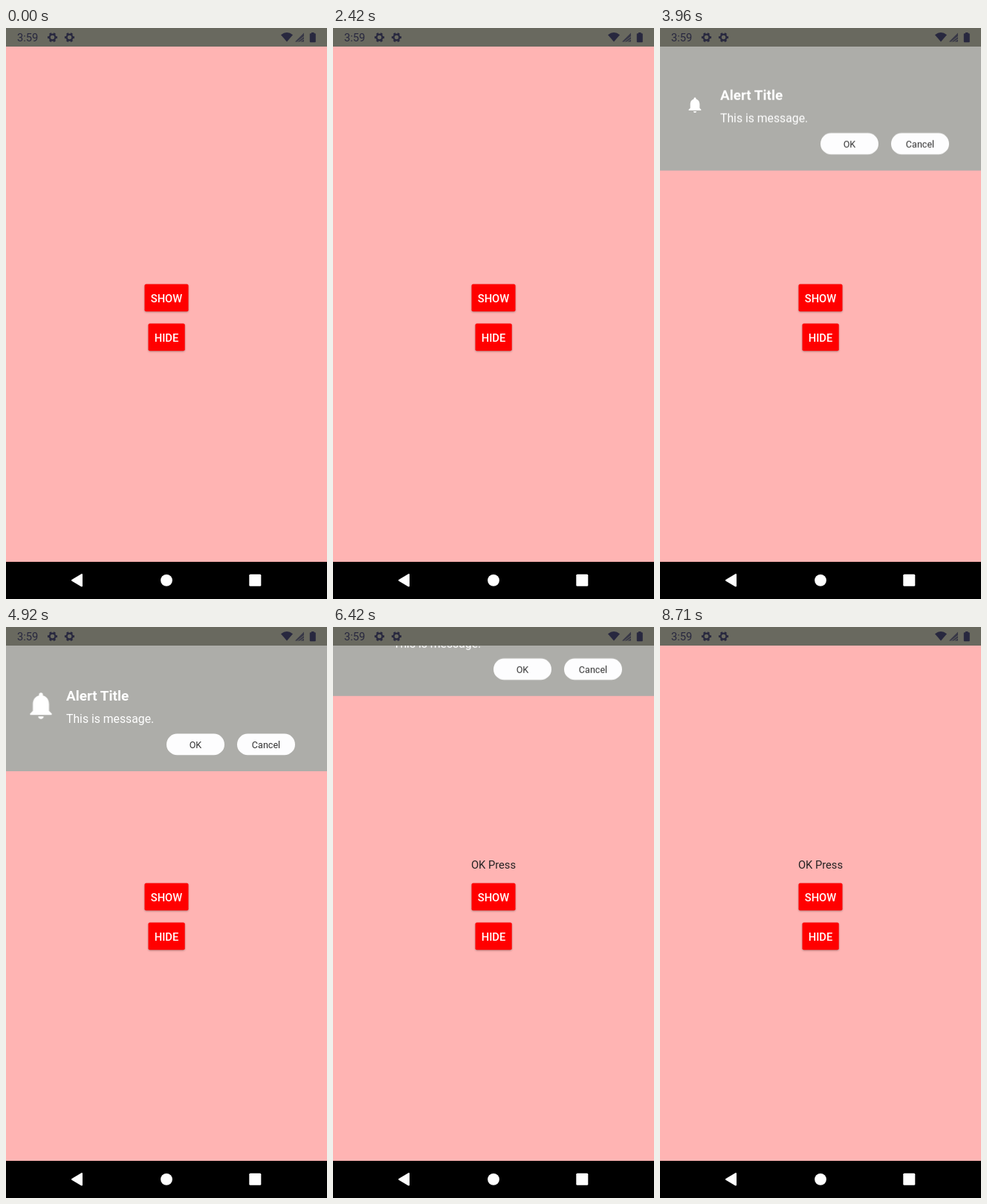
An HTML page for the animation above (8750 ms loop, 432 px wide and 768 px high).

```html
<!DOCTYPE html>
<html lang="en">
<head>
<meta charset="utf-8">
<title>Dropdown alert</title>
<style>
  html, body { margin: 0; width: 100%; height: 100%; overflow: hidden; background: #ffb4b3; }
  svg { display: block; width: 432px; height: 768px; font-family: Roboto, sans-serif; }
  .mid { text-anchor: middle; }
  .btn rect { fill: #f00; filter: drop-shadow(0 1px 1px rgba(0, 0, 0, .3)); }
  .btn text { fill: #fff; font-size: 14.7px; font-weight: 500; }
  .pill rect { fill: #fdfdfe; }
  .pill text { fill: #333; font-size: 12.6px; }

  .panel { animation: slide 8750ms infinite; }
  .bell { animation: pulse 625ms -404ms ease-in-out infinite; }
  .label { animation: reveal 8750ms step-end infinite; }

  @keyframes slide {
    0%, 38.54% { transform: translateY(-196px); animation-timing-function: linear; }
    39.56% { transform: translateY(-105.5px); animation-timing-function: cubic-bezier(.12, .6, .3, 1); }
    45.26% { transform: translateY(-2.3px); animation-timing-function: ease-out; }
    50.29%, 72.46% { transform: translateY(0); animation-timing-function: linear; }
    73.39% { transform: translateY(-102px); animation-timing-function: cubic-bezier(.12, .6, .3, 1); }
    79.5%, 100% { transform: translateY(-196px); }
  }
  @keyframes pulse {
    0%, 100% { transform: scale(1.05); }
    50% { transform: scale(1.82); }
  }
  @keyframes reveal {
    0% { opacity: 0; }
    72.46%, 100% { opacity: 1; }
  }
</style>
</head>
<body>
<svg viewBox="0 0 432 768">
  <defs>
    <g id="gear" fill="none" stroke="#28283f">
      <circle r="3.9" stroke-width="2.3"/>
      <circle r="5.6" stroke-width="2" pathLength="12" stroke-dasharray="1 1" stroke-dashoffset=".5"/>
    </g>
  </defs>
  <rect width="432" height="768" fill="#ffb4b3"/>

  <text class="mid label" x="216" y="324.5" font-size="14.7" fill="#222">OK Press</text>
  <g class="btn mid">
    <rect x="186.5" y="344.5" width="59" height="36.8" rx="2"/>
    <text x="216" y="369">SHOW</text>
    <rect x="191.5" y="397.5" width="49.2" height="36.8" rx="2"/>
    <text x="216" y="422">HIDE</text>
  </g>

  <g class="panel">
    <rect width="432" height="194" fill="#adada9"/>
    <g transform="translate(47 106)">
      <g class="bell">
        <path transform="translate(-12 -12.25)" fill="#fff" d="M12 22c1.1 0 2-.9 2-2h-4c0 1.1.9 2 2 2zm6-6v-5c0-3.07-1.64-5.64-4.5-6.32V4c0-.83-.67-1.5-1.5-1.5s-1.5.67-1.5 1.5v.68C7.63 5.36 6 7.92 6 11v5l-2 2v1h16v-1z"/>
      </g>
    </g>
    <g fill="#fff">
      <text x="81" y="99" font-size="18.9" font-weight="700">Alert Title</text>
      <text x="81" y="128.5" font-size="15.75">This is message.</text>
    </g>
    <g class="pill mid">
      <rect x="216" y="143.5" width="78" height="28.8" rx="14.4"/>
      <text x="255" y="162.5">OK</text>
      <rect x="311" y="143.5" width="78" height="28.8" rx="14.4"/>
      <text x="350" y="162.5">Cancel</text>
    </g>
  </g>

  <rect width="432" height="25" fill="#69695f"/>
  <g fill="#28283f">
    <text x="15" y="17.8" font-size="14.7">3:59</text>
    <use href="#gear" x="62.5" y="12.6"/>
    <use href="#gear" x="85.5" y="12.6"/>
    <path d="M370 9.2Q378 2.8 386 9.2L378 18.6z"/>
    <path d="M389 18.5L401 6.5V18.5z" opacity=".75"/>
    <path d="M392 18.5l9-7M395 19l6-4" stroke="#69695f" stroke-width=".9"/>
    <path d="M411 6h3.6v1.3h1.2q1 0 1 1v9.9q0 1-1 1h-6q-1 0-1-1V8.3q0-1 1-1h1.2z"/>
  </g>

  <rect y="718" width="432" height="50"/>
  <g fill="#fff">
    <path d="M89 742.8l13-7.8v15.6z" stroke="#fff" stroke-width="2" stroke-linejoin="round"/>
    <circle cx="216" cy="742.8" r="7.9"/>
    <rect x="327.3" y="734.8" width="16" height="16" rx="1.5"/>
  </g>
</svg>
</body>
</html>
```
